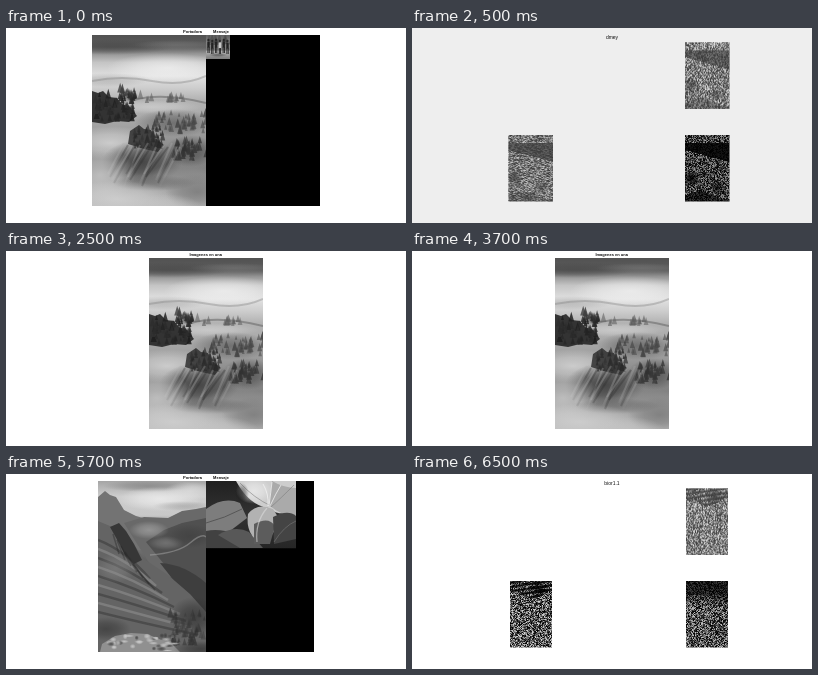
Animation of 400x195 px, one loop 8 s. Source, as an HTML page with a canvas:

```html
<!DOCTYPE html>
<html lang="es">
<head>
<meta charset="utf-8">
<style>
html, body { margin: 0; width: 100%; height: 100%; overflow: hidden; background: #fff; }
canvas, svg { position: absolute; left: 0; top: 0; width: 400px; height: 195px; }
text { font: 5px "Liberation Sans", Arial, sans-serif; text-anchor: middle; fill: #111; }
.b { font-weight: bold; font-size: 4px; }
</style>
</head>
<body>
<canvas width="400" height="195"></canvas>
<svg viewBox="0 0 400 195">
  <g id="pair"><text class="b" x="186.5" y="5.4">Portadora</text><text class="b" x="215" y="5.4">Mensaje</text></g>
  <g id="dmey"><text x="200" y="11.4">dmey</text></g>
  <g id="joined"><text class="b" x="199.7" y="5.4">Imagenes en una</text></g>
  <g id="bior"><text x="200" y="11.4">bior1.1</text></g>
</svg>
<script>
const c = document.querySelector('canvas').getContext('2d');
let seed;
const rnd = () => {
  seed = (seed + 0x6D2B79F5) | 0;
  let t = Math.imul(seed ^ (seed >>> 15), 1 | seed);
  t = (t + Math.imul(t ^ (t >>> 7), 61 | t)) ^ t;
  return ((t ^ (t >>> 14)) >>> 0) / 4294967296;
};
const grey = (v, a = 1) => `rgba(${v},${v},${v},${a})`;

function rect(x, y, w, h, v) { c.fillStyle = grey(v); c.fillRect(x, y, w, h); }

// Vertical gradient; stops are [position, grey] pairs
function fade(w, h, stops) {
  const g = c.createLinearGradient(0, 0, 0, h);
  stops.forEach(([p, v]) => g.addColorStop(p, grey(v)));
  c.fillStyle = g;
  c.fillRect(0, 0, w, h);
}
function shape(path, v, a = 1) { c.fillStyle = grey(v, a); c.fill(new Path2D(path)); }
function line(path, v, a, width) {
  c.strokeStyle = grey(v, a);
  c.lineWidth = width;
  c.stroke(new Path2D(path));
}
function blob(x, y, rx, ry, v, a) {
  c.save();
  c.translate(x, y);
  c.scale(rx, ry);
  const g = c.createRadialGradient(0, 0, 0, 0, 0, 1);
  g.addColorStop(0, grey(v, a));
  g.addColorStop(0.5, grey(v, a * 0.65));
  g.addColorStop(1, grey(v, 0));
  c.fillStyle = g;
  c.fillRect(-1, -1, 2, 2);
  c.restore();
}
function trees(x, y, w, h, n, v, a) {
  for (let i = 0; i < n; i++) {
    const px = x + rnd() * w, py = y + rnd() * h, s = 4 + rnd() * 6, k = s * 0.3;
    shape(`M${px} ${py - s}l${k} ${s}h${-2 * k}z`, Math.round(v + rnd() * 22), a);
  }
}
function photo(x, y, w, h, draw) {
  c.save();
  c.translate(x, y);
  c.beginPath();
  c.rect(0, 0, w, h);
  c.clip();
  draw(w, h);
  c.restore();
}

function forest(w, h) {
  fade(w, h, [[0, 82], [.07, 92], [.11, 150], [.16, 196], [.24, 225], [.31, 205], [.38, 178],
    [.46, 172], [.55, 160], [.66, 140], [.78, 128], [.88, 160], [1, 180]]);
  blob(20, 12, 60, 8, 70, .6);
  blob(85, 10, 45, 5, 125, .5);
  blob(75, 33, 60, 15, 245, .7);
  blob(15, 45, 45, 7, 160, .5);
  line('M0 46Q30 40 60 46T114 41', 130, .4, 2);
  line('M42 65Q70 57 114 68', 95, .5, 2);
  blob(60, 72, 50, 7, 225, .5);
  trees(28, 57, 17, 8, 18, 55, .85);
  trees(48, 64, 50, 4, 14, 80, .6);
  blob(38, 61, 8, 6, 45, .7);
  shape('M0 56l6 2 5-2 6 6 8 1 5 6 8 3 7 9-8 6-12-1-12 3-13-2z', 38, .9);
  trees(0, 62, 44, 25, 60, 28, .85);
  blob(82, 88, 40, 14, 70, .55);
  trees(62, 78, 52, 22, 48, 58, .6);
  blob(18, 108, 50, 17, 218, .8);
  shape('M38 96l9-6 5 4 7 1 5 9 8 6-6 7-14-3-16-5z', 48, .85);
  trees(40, 94, 31, 20, 42, 38, .8);
  trees(82, 108, 32, 18, 42, 42, .75);
  blob(98, 116, 25, 16, 55, .6);
  blob(50, 127, 40, 22, 55, .8);
  for (let i = 0; i < 15; i++) {
    const x = 26 + i * 4;
    line(`M${x + 6} ${108 + i % 3 * 2}L${x - 10 - i % 4 * 2} ${139 + i % 5 * 3}`, i % 2 ? 45 : 175, .32, 2);
  }
  blob(8, 140, 35, 28, 205, .75);
  blob(92, 139, 32, 12, 140, .6);
  blob(62, 148, 42, 8, 80, .45);
  blob(25, 164, 60, 18, 212, .8);
  blob(105, 157, 32, 18, 105, .6);
  blob(75, 172, 35, 13, 200, .6);
}

function group(w, h) {
  fade(w, h, [[0, 95], [.3, 130], [.62, 120], [.68, 175], [1, 125]]);
  trees(0, 5, w, 6, 14, 65, .7);
  for (let i = 0; i < 6; i++) {
    const x = 2.5 + i * 3.8, y = 5 + i % 2;
    blob(x, y, 1.6, 1.8, 25, 1);
    rect(x - 1.2, y + 1.5, 2.4, 6, i == 3 ? 200 : 35);
    rect(x - 1, y + 7, .8, 6, 25);
    rect(x + .3, y + 7, .8, 6, 25);
  }
  blob(12, 20, 9, 2, 65, .6);
}

function valley(w, h) {
  fade(w, h, [[0, 165], [.09, 205], [.2, 200], [.26, 140], [.5, 90], [1, 70]]);
  blob(50, 5, 45, 6, 120, .6);
  blob(62, 18, 42, 12, 238, .8);
  blob(92, 10, 26, 9, 225, .7);
  blob(85, 25, 30, 5, 150, .5);
  shape('M0 16l7-6 5 4 6 2 8 13 12 6 14 4v30H0z', 115);
  shape('M26 42l20-6 24 1 14-7 14-2 10-2v70H60z', 105);
  shape('M48 61l18-12 18-7 24-5v85L70 88z', 80);
  blob(51, 49, 20, 9, 175, .6);
  blob(68, 62, 18, 7, 145, .5);
  blob(92, 55, 24, 12, 60, .6);
  line('M52 74Q80 72 92 62T108 56', 165, .5, 1.5);
  shape('M62 82Q86 83 108 102v32L84 110z', 62);
  shape('M0 40l12 5 12 2 10 14 12 17 24 16 22 19 16 18v40H0z', 100);
  shape('M12 46l9-4 7 8 8 13 8 16-8 4-9-9-6-12z', 55);
  for (let i = 0; i < 9; i++)
    line(`M0 ${59 + i * 9}Q${28 + i * 2} ${70 + i * 9} ${52 + i * 6} ${98 + i * 7}`, i % 2 ? 150 : 52, .5, 2.5);
  for (let i = 0; i < 7; i++)
    line(`M${15 + i * 4} ${53 + i * 6}l${6 + i * 2} 20`, 38, .4, 1.5);
  blob(18, 87, 20, 15, 145, .4);
  blob(96, 136, 25, 20, 45, .65);
  trees(72, 135, 36, 30, 60, 42, .55);
  blob(8, 148, 25, 12, 45, .55);
  shape('M4 163l13-8 16-3 16 1 12 5 13 5 8 8H2z', 155, .8);
  for (let i = 0; i < 36; i++)
    blob(4 + rnd() * 72, 154 + rnd() * 16, 2 + rnd() * 4, 1 + rnd() * 2, i % 3 ? 205 : 60, .8);
  blob(103, 168, 28, 8, 40, .6);
}

function flower(w, h) {
  fade(w, h, [[0, 32], [.5, 50], [1, 38]]);
  shape('M0 28Q18 15 34 22L41 37 24 50 0 55z', 125);
  line('M0 42Q19 37 36 28', 70, .7, 1);
  shape('M0 50Q25 45 49 67H0z', 65);
  shape('M12 54Q29 44 43 51L57 67H34z', 88);
  shape('M30 0H90V29Q75 37 62 27 43 24 30 0z', 205);
  shape('M66 0Q78 7 90 7V35Q75 35 63 24z', 170);
  blob(48, 10, 18, 13, 235, .8);
  line('M34 2Q48 17 65 25M88 4Q74 18 65 26', 120, .7, .8);
  line('M62 25Q63 13 57 3M64 25Q70 12 75 4M63 25Q65 10 66 1', 245, .9, .8);
  shape('M42 33Q51 21 67 28L72 36Q70 55 56 63 39 54 42 33z', 178);
  shape('M48 43Q63 35 69 45L64 63H48z', 92);
  line('M61 27Q49 41 51 61', 220, .6, 1.2);
  shape('M67 36Q82 28 90 35V58L68 63z', 68);
  line('M68 61Q78 45 90 40', 130, .5, 1);
  blob(36, 12, 7, 10, 25, .5);
}

// Grain whose darkness depends on the place inside the panel (u, v in 0..1)
function grain(x, y, w, h, dark) {
  for (let j = 0; j < h; j++)
    for (let i = 0; i < w; i++) {
      const k = 1 - Math.min(.9, dark(i / w, j / h));
      rect(x + i, y + j, Math.min(1, w - i), Math.min(1, h - j), Math.round(225 * rnd() ** 1.35 * k));
    }
}
const spot = (u, v, x, y, r) => Math.max(0, 1 - Math.hypot(u - x, (v - y) * 1.5) / r);

const veil = (base, lo) => (u, v) => {
  const band = v > .12 && v < .22 + u * .18 ? .62 : 0;
  return base + band + .7 * spot(u, v, .13, .64, .2) + .55 * spot(u, v, .72, .78, .18)
    + (v > .9 - .06 * Math.sin(u * 5) ? lo : 0);
};
const ridge = (u, v) => v < .2 - .05 * Math.cos(u * 6)
  ? .48 + .4 * Math.sin(v * 95 + u * 9) + .7 * spot(u, v, .68, .13, .22) : .03;
const dusk = (u, v) => v < .2 ? .72 : .12 + Math.max(0, .5 - (v - .2) * 2.4) * (.5 + u * .6);

function pair(x, w) { rect(x, 7, w, 171, 0); }

const scenes = [
  [0, 'pair', () => {
    pair(86, 228);
    photo(86, 7, 114, 171, forest);
    photo(200, 7, 24, 24, group);
  }],
  [500, 'dmey', () => {
    rect(0, 0, 400, 195, 238);
    grain(273, 14.5, 44.5, 66.5, veil(.02, .4));
    grain(96.5, 107, 44.5, 66.5, veil(.12, .3));
    grain(273, 107, 44.5, 66.5, veil(.3, .45));
  }],
  [2500, 'joined', () => photo(143, 7, 114, 171, forest)],
  [4500, 'pair', () => {
    pair(92, 216);
    photo(92, 7, 108, 171, valley);
    photo(200, 7, 90, 67.5, flower);
  }],
  [6500, 'bior', () => {
    grain(274, 14.5, 42, 66.5, ridge);
    grain(98, 107, 42, 66.5, ridge);
    grain(274, 107, 42, 66.5, dusk);
  }]
];

let shown;
function tick() {
  const t = performance.now() % 8000;
  const scene = scenes.filter(s => s[0] <= t).pop();
  if (scene !== shown) {
    shown = scene;
    seed = 7;
    rect(0, 0, 400, 195, 255);
    scene[2]();
    document.querySelectorAll('g').forEach(g => g.style.display = g.id === scene[1] ? '' : 'none');
  }
  requestAnimationFrame(tick);
}
tick();
</script>
</body>
</html>
```
